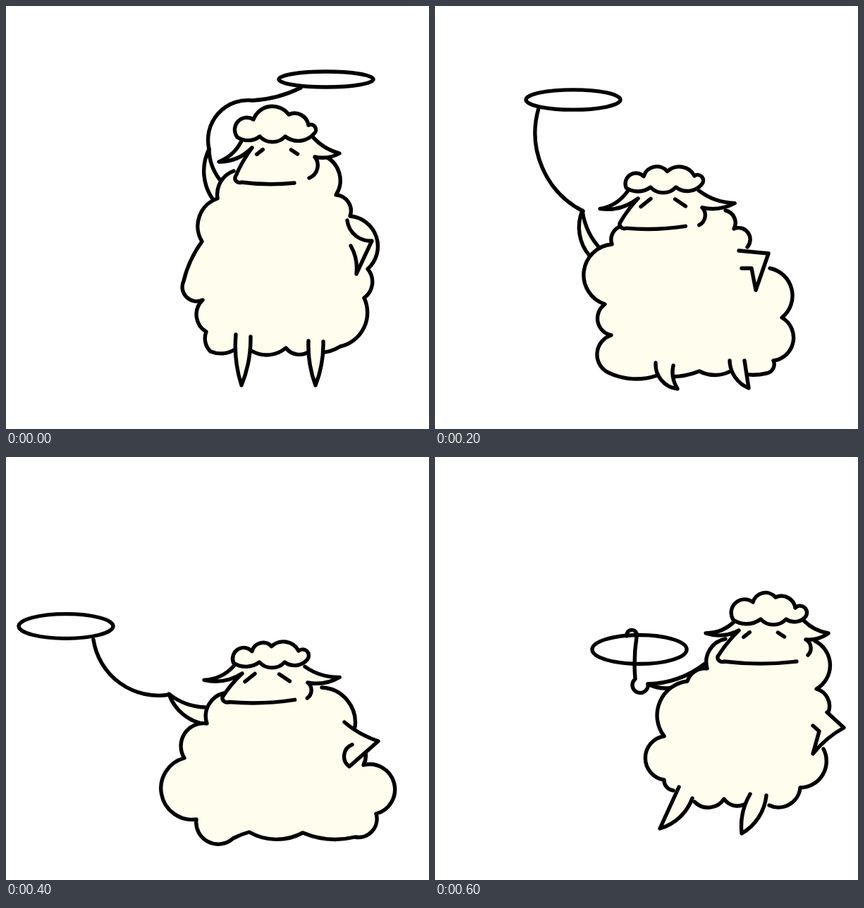
Write an HTML page that moves like this. It is 600 px wide and 600 px high and loops after 700 ms.

```html
<!DOCTYPE html>
<html lang="en">
<head>
<meta charset="utf-8">
<title>Sheep with a lasso</title>
<style>
html, body { margin: 0; width: 100%; height: 100%; overflow: hidden; background: #fff; }
svg { display: block; width: 100vw; height: 100vh; }
.skin { fill: #fffdee; }
.ink { fill: none; stroke: #000; stroke-width: 5.4; stroke-linecap: round; stroke-linejoin: round; }
</style>
</head>
<body>
<svg id="stage" viewBox="0 0 600 600"></svg>
<script>
// A stroke is a chain of arcs: "x,y,bulge", the bulge being a percentage of the
// chord, to the right of travel when positive. ";" lifts the pen.
// eye: left eye, which carries the whole head. arm: armpit, hand, shoulder.
const poses = [
  {
    eye: [360, 207], loop: [454, 104], arm: [[294, 275], [288, 203], [303, 246]],
    rope: "418,116 350,134,-5 288,203,26",
    body: "323,234 300,273,18 278,334,24 252,390,5 279,417,35 284,462,25 290,490,15 325,487,12 348,489 397,485,16 430,490,20 474,483,10 508,414,24 513,373,22 488,298,33 468,268,25 452,213,23",
    legs: ["326,466 334,538,5 347,469,5", "429,475 439,538,5 450,476,5"],
    hip: "484,304 519,333,20 497,380 489,340,8"
  },
  {
    eye: [317, 242], loop: [364, 97], arm: [[241, 316], [234, 248], [260, 302]],
    rope: "300,104 236,247,25",
    body: "282,270 262,302,12 242,316 246,384,24 254,440,24 300,500,34 316,504 393,496,12 447,489,9 474,463,20 492,417,30 483,347,31 ; 452,316 439,290,30 428,252,12",
    legs: ["313,485 345,538,12 339,492,5", "418,487 444,535,12 442,480,5"],
    hip: "448,319 487,328,5 466,387 460,347 448,346"
  },
  {
    eye: [299, 279], loop: [196, 133], arm: [[219, 354], [209, 290], [236, 346]],
    rope: "147,145 210,291,18",
    body: "262,313 251,338,20 241,423,41 250,467,33 246,520,34 315,524,10 375,518,7 421,517,13 470,521,8 480,503,25 492,442,36 475,372,32 ; 443,342 424,316,40 412,290,25",
    legs: ["313,506 344,543,20 338,510,-10", "418,503 445,542,15 439,503"],
    hip: "431,347 473,351 455,403 449,372 435,372"
  },
  {
    eye: [326, 298], loop: [95, 205], arm: [[250, 374], [218, 321], [267, 361]],
    rope: "77,223 218,322,16",
    body: "290,328 267,363,20 246,425,27 258,499,48 340,528,31 408,527,9 435,528,3 492,516,15 517,484,32 493,408,41 ; 483,369 467,348,25 437,308,18",
    legs: ["322,522 338,543,20 342,526", "433,522 446,545,10 452,526"],
    hip: "459,363 508,380,8 470,423,4 471,392,-15"
  },
  {
    eye: [346, 313], loop: [85, 240], arm: [[283, 379], [231, 336], [282, 355]],
    rope: "124,259 232,337,21",
    body: "309,335 285,378,22 253,427,32 270,514,47 322,541,35 345,532,-3 421,533,13 495,539,8 525,506,28 507,437,50 510,418,8 ; 495,383 448,327,22",
    legs: [],
    hip: "480,376 528,403,5 487,439 491,408,-30"
  },
  {
    eye: [389, 301], loop: [140, 276], arm: [[325, 362], [257, 355], [328, 342]],
    rope: "193,261 211,268,-35 240,352,3 257,355,45",
    body: "356,312 326,362,17 286,421,25 299,504,41 360,531,28 394,531,14 458,529,16 525,500,26 540,430,36 ; 526,391 505,335,22 488,312,20",
    legs: [],
    hip: "509,381 554,406,4 511,454,6 519,419 511,415"
  },
  {
    eye: [442, 252], loop: [290, 273], arm: [[358, 318], [302, 322], [383, 293]],
    rope: "272,254 286,255,-65 284,315,3 302,322,85",
    body: "412,258 386,300,22 358,318,18 325,396,29 325,458,43 338,473,20 ; 368,489 410,485,24 438,493,18 ; 474,494 518,469,26 551,414,28 ; 558,362 541,329,22 539,261,30",
    legs: ["346,468 319,527 365,484,12", "447,478 435,534,8 470,480,12"],
    hip: "556,362 580,384 536,421,5 545,389 536,381"
  }
];

const STEP = 100;
const stage = document.getElementById("stage");

function make(tag, parent, attributes = {}) {
  const node = document.createElementNS("http://www.w3.org/2000/svg", tag);
  for (const key in attributes) node.setAttribute(key, attributes[key]);
  return parent.appendChild(node);
}

function parse(text) {
  return text.split(";").map(piece => piece.trim().split(/\s+/).map(p => p.split(",").map(Number)));
}

function arc([x0, y0], [x, y, percent = 0]) {
  if (!percent) return `L${x} ${y}`;
  const bulge = Math.abs(percent) / 100;
  const radius = Math.hypot(x - x0, y - y0) * (1 + 4 * bulge * bulge) / (8 * bulge);
  return `A${radius} ${radius} 0 ${+(bulge > 0.5)} ${+(percent < 0)} ${x} ${y}`;
}

function trace([first, ...rest]) {
  let pen = first;
  return `M${first[0]} ${first[1]}` + rest.map(point => {
    const d = arc(pen, point);
    pen = point;
    return d;
  }).join("");
}

function drawLine(parent, pieces) {
  make("path", parent, { class: "ink", d: pieces.map(trace).join("") });
}

// One filled area spans all pieces; only the pieces themselves are inked.
function drawSolid(parent, pieces) {
  const area = pieces.map(trace).map((d, i) => i ? d.replace("M", "L") : d).join("");
  make("path", parent, { class: "skin", d: area + "Z" });
  drawLine(parent, pieces);
}

// squash peaks mid-loop; turn runs from 0 to 1 as the sheep swings to the right.
function drawHead(parent, [ex, ey], squash, turn) {
  const at = (x, y, bulge) => [ex + x, ey + y, bulge];
  const chin = [-35 - 6 * turn, 36 - 5 * turn - 6 * squash];
  const rootR = [78 + 6 * turn, 7];

  drawSolid(parent, [
    [at(-24 + 8 * turn - 5 * squash, -20 + 4 * squash), at(-58 - 8 * squash, 14 - 16 * turn, -10), at(-11, -6, 10)],
    [
      at(-11, -6), at(...chin, 3), at(chin[0] + 9, chin[1] + 7, 30),
      at(49 + 22 * turn, 44 - 10 * squash - 6 * turn, 3)
    ],
    [at(70 + 17 * turn, 37 - 8 * turn - 3 * squash), at(...rootR, 25)],
    [
      at(...rootR), at(113 + 14 * squash + 3 * turn, 2 - 4 * turn, 9),
      at(72 + 9 * turn, -25 + 7 * squash + 5 * turn, -8)
    ]
  ]);

  const fringe = at(-32 + 13 * turn, -21);
  drawSolid(parent, [[
    fringe, at(20 * turn, -22, 16), at(36 + 20 * turn, -22, 22),
    at(77 + 7 * turn, -26, 20), at(69, -38, 45),
    at(41 - 12 * squash, -53 + 10 * squash, 25), at(-9 + 18 * turn, -46 + 10 * squash, 30),
    [...fringe.slice(0, 2), 42]
  ]]);

  const reach = 5.5 + 4 * squash;
  const eye = (x, dx, dy) => drawLine(parent, [[at(x - dx, -dy), at(x + dx, dy)]]);
  eye(0, -0.78 * reach, 0.62 * reach);
  eye(49, 0.83 * reach, 0.55 * reach);
}

const groups = poses.map(({ eye, loop, arm, rope, body, legs, hip }, i) => {
  const group = make("g", stage);
  const turn = i / (poses.length - 1);
  const [armpit, hand, shoulder] = arm;
  drawSolid(group, [[armpit, [...hand, -14], [...shoulder, 8]]]);
  [body, ...legs, hip].forEach(part => drawSolid(group, parse(part)));
  drawHead(group, eye, Math.sin(Math.PI * turn), turn);
  drawLine(group, parse(rope));
  make("ellipse", group, { class: "ink", cx: loop[0], cy: loop[1], rx: 67, ry: 11 + 9.5 * turn });
  return group;
});

function render(time) {
  const current = Math.floor(time / STEP) % groups.length;
  groups.forEach((group, i) => group.setAttribute("display", i === current ? "inline" : "none"));
}

const start = performance.now();
function tick() {
  render(performance.now() - start);
  requestAnimationFrame(tick);
}
tick();
</script>
</body>
</html>
```
